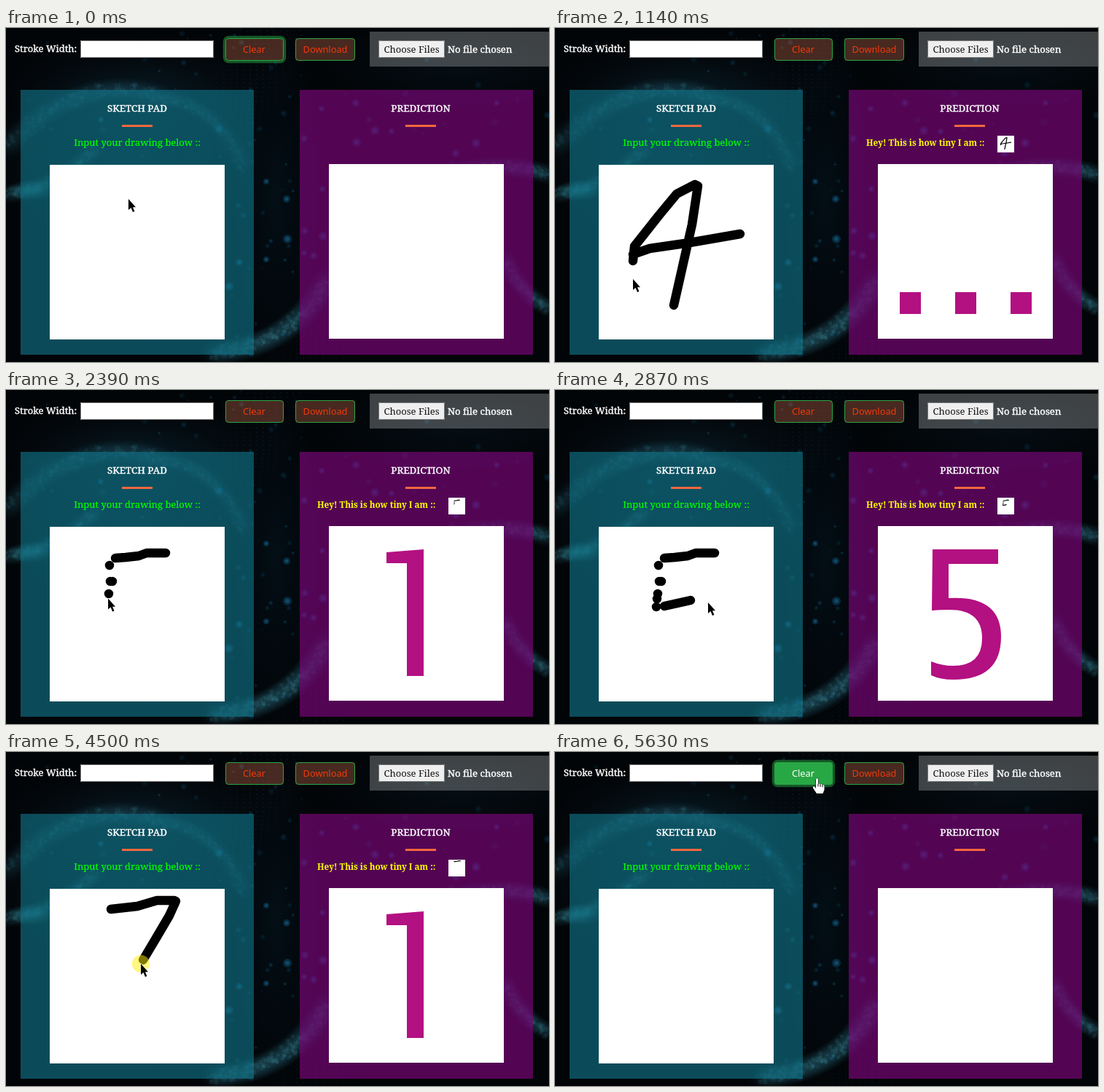
Animation of 745x459 px, one loop 5650 ms. Source, as an HTML page with a canvas:

```html
<!DOCTYPE html>
<html lang="en">
<head>
<meta charset="utf-8">
<title>Digit sketch pad</title>
<style>
html, body { margin: 0; width: 100%; height: 100%; overflow: hidden; background: #020508; }
canvas { display: block; }
</style>
</head>
<body>
<canvas id="stage" width="745" height="459"></canvas>
<script>
const W = 745, H = 459, LOOP = 5650, STEP = 95.5, TAU = Math.PI * 2;
const SERIF = '"Noto Serif", serif', SANS = '"Noto Sans", sans-serif';
const stage = document.getElementById('stage').getContext('2d');

const MOVE = 0, INK = 1, DOT = 2;
// Pointer track: step, x, y, how the pointer arrives
const track = [
  // 4: hook and stem, crossbar, then the diagonal
  [0, 168, 235, MOVE], [.8, 167, 228, MOVE], [1.2, 192, 215, INK], [1.4, 196, 217, INK], [1.9, 188, 270, INK],
  [2.9, 163, 381, INK], [3, 163, 383, MOVE], [4.3, 107, 311, MOVE], [4.6, 130, 303, INK], [5.1, 185, 295, INK],
  [5.8, 254, 283, INK], [9.5, 167, 228, MOVE], [10, 143, 257, INK], [10.7, 109, 300, INK], [11, 107, 320, INK],
  [12, 107, 345, MOVE], [13.5, 107, 345, MOVE], [16, 357, 25, MOVE], [17, 357, 25, MOVE],
  // 5: top bar, a broken back, middle bar, broken bowl
  [18.2, 219, 224, MOVE], [18.5, 193, 224, INK], [18.7, 182, 228, INK], [19, 164, 230, INK], [19.4, 150, 231, INK],
  [20.6, 142, 241, DOT], [21.3, 143, 263, DOT], [21.4, 146, 263, DOT], [21.8, 141, 280, DOT],
  [25.3, 140, 287, DOT], [25.6, 139, 298, DOT], [26.2, 150, 297, MOVE], [27.3, 186, 289, INK],
  [30, 210, 292, MOVE], [31, 210, 289, DOT], [32.2, 215, 293, DOT], [32.6, 219, 308, DOT], [33.1, 224, 323, DOT],
  [33.6, 220, 344, DOT], [38, 222, 350, MOVE], [40.8, 357, 28, MOVE], [41, 358, 25, MOVE], [42, 357, 21, MOVE],
  // 7: top bar, then the stem
  [43, 144, 216, MOVE], [43.7, 180, 212, INK], [44, 207, 204, INK], [44.3, 231, 204, INK],
  [46, 233, 205, MOVE], [46.4, 224, 225, INK], [46.7, 204, 259, INK], [47, 185, 291, INK], [47.8, 138, 373, INK],
  [48, 138, 380, MOVE], [55, 138, 380, MOVE], [58, 358, 36, MOVE], [60, 358, 36, MOVE]
];
const clears = [0, 17, 42, 59], presses = [17, 42, 58];

// Prediction pane: step, what it shows, step of the thumbnail snapshot
const results = [
  [0, ''], [4, 'wait', 3], [5, '1', 3], [6, 'wait', 6], [8, '7', 6], [12, 'wait', 12], [14, '4', 12], [17, ''],
  [20, 'wait', 20], [21, '1', 20], [22, 'wait', 22], [24, '1', 22], [28, 'wait', 28], [30, '5', 28],
  [34, 'wait', 34], [37, '5', 34], [42, ''],
  [45, 'wait', 45], [46, '1', 45], [49, 'wait', 49], [51, '7', 49], [59, '']
];
const digits = {
  1: 'M522 223L573 219V393H550V238H522Z',
  4: 'M577 219H600V333H622V352H600V393H577V352H502V333ZM577 248L524 333H577Z',
  5: 'M518 219H608V239H540V286Q612 282 612 339Q612 398 547 398Q528 398 516 392V373Q531 379 546 379Q586 379 586 341Q586 302 541 302Q528 302 517 303Z',
  7: 'M510 219H617V239L550 393H524L592 239H510Z'
};
const arrow = new Path2D('M0 0V15L3.5 12L6 18L8.4 17L6 11.3H10Z');
const hand = new Path2D('M0 1.5Q1.5-1 3 1.5V8Q5 6.5 6 8.5Q8 7 9 9Q11.5 8 11.5 11V16L9.5 21H1L-4 13.5Q-4.5 10.5-2 11.5L0 14Z');

function disc(c, x, y, r, color) {
  c.fillStyle = color;
  c.beginPath();
  c.arc(x, y, r, 0, TAU);
  c.fill();
}

function box(c, x, y, w, h, fill, border, radius = 0) {
  c.beginPath();
  c.roundRect(x, y, w, h, radius);
  c.fillStyle = fill;
  c.fill();
  if (!border) return;
  c.beginPath();
  c.roundRect(x + .5, y + .5, w - 1, h - 1, radius);
  c.strokeStyle = border;
  c.lineWidth = 1;
  c.stroke();
}

function text(c, str, x, y, font, color, align = 'left', weight = 0) {
  c.font = font;
  c.fillStyle = c.strokeStyle = color;
  c.textAlign = align;
  c.fillText(str, x, y);
  if (!weight) return;
  c.lineWidth = weight;
  c.strokeText(str, x, y);
}

function drawBackdrop(c) {
  let seed = 11;
  const rnd = () => (seed = seed * 16807 % 2147483647) / 2147483647;
  const glow = (x, y, rx, ry, rgb, alpha) => {
    c.save();
    c.translate(x, y);
    c.scale(rx, ry);
    const g = c.createRadialGradient(0, 0, 0, 0, 0, 1);
    g.addColorStop(0, `rgba(${rgb},${alpha})`);
    g.addColorStop(1, `rgba(${rgb},0)`);
    disc(c, 0, 0, 1, g);
    c.restore();
  };
  // Dotted, glowing ribbon along a quadratic curve
  const ribbon = (x0, y0, x1, y1, x2, y2, width, alpha) => {
    for (let i = 0; i <= 70; i++) {
      const t = i / 70, s = 1 - t;
      const x = s * s * x0 + 2 * s * t * x1 + t * t * x2;
      const y = s * s * y0 + 2 * s * t * y1 + t * t * y2;
      glow(x, y, width * 1.2, width, '45,120,140', alpha * .22);
      for (let j = 0; j < 2; j++)
        disc(c, x + (rnd() - .5) * width, y + (rnd() - .5) * width, 1.5 + rnd() * 2, `rgba(70,150,170,${alpha * .4})`);
    }
  };
  c.fillStyle = '#020508';
  c.fillRect(0, 0, W, H);
  glow(190, 90, 190, 75, '20,65,85', .22);
  glow(170, 170, 190, 130, '12,65,90', .3);
  glow(620, 50, 180, 60, '14,50,65', .2);
  glow(370, 230, 60, 240, '5,35,52', .3);
  // Faint columns of points
  for (let x = 205; x < 500; x += 9)
    for (let y = 4; y < H; y += 6) {
      const a = Math.max(0, Math.sin(x / 47 + y / 90)) * .18;
      disc(c, x + Math.sin(y / 40) * 4, y, 1.2, `rgba(20,75,100,${a})`);
    }
  ribbon(0, 165, 105, 55, 215, 96, 18, .22);
  ribbon(215, 96, 290, 105, 325, 190, 14, .13);
  ribbon(0, 228, 60, 225, 125, 165, 14, .18);
  ribbon(285, 446, 390, 440, 442, 345, 18, .34);
  ribbon(595, 205, 680, 178, 745, 202, 15, .24);
  ribbon(683, 315, 705, 365, 745, 385, 13, .17);
  glow(35, 223, 34, 15, '55,190,205', .35);
  const spot = (x, y, r, a) => {
    disc(c, x, y, r, `rgba(18,95,140,${a * .45})`);
    disc(c, x, y, r * .5, `rgba(30,120,160,${a * .5})`);
  };
  for (let i = 0; i < 70; i++)
    spot(210 + rnd() * 190, rnd() * H, 1.5 + rnd() * 3, .15 + rnd() * .3);
  for (let i = 0; i < 35; i++)
    spot(rnd() * W, rnd() * 190, 1.5 + rnd() * 4, .1 + rnd() * .3);
  [[433, 111], [480, 103], [506, 141], [529, 142], [409, 152], [481, 157], [673, 103], [617, 172], [645, 158],
   [434, 221], [410, 279], [435, 286], [409, 309], [422, 313], [292, 138], [130, 126], [320, 322], [306, 355],
   [357, 211], [385, 235], [386, 290], [357, 318]].forEach(([x, y], i) => spot(x, y, 4 + i % 3, .8));

  box(c, 20, 85, 320, 364, 'rgba(17,115,135,.64)');
  box(c, 403, 85, 320, 364, 'rgba(117,7,117,.7)');
  box(c, 499, 5, 246, 48, 'rgba(255,255,255,.24)');
  text(c, 'Stroke Width:', 12, 33, '13px ' + SERIF, '#fff', 'left', .4);
  box(c, 102, 17, 183, 24, '#fff', '#767676');
  box(c, 511, 17, 91, 24, '#efefef', '#767676', 2);
  text(c, 'Choose Files', 556.5, 34, '13px ' + SERIF, '#111', 'center');
  text(c, 'No file chosen', 606, 34, '13.2px ' + SERIF, '#fff', 'left', .4);
  box(c, 397, 14, 82, 31, 'rgba(155,85,62,.45)', '#28a745', 4);
  text(c, 'Download', 438, 34, '12.8px ' + SANS, '#f23a0a', 'center');
  text(c, 'SKETCH PAD', 180, 115, '13.4px ' + SERIF, '#fff', 'center', .4);
  text(c, 'PREDICTION', 569, 115, '13.4px ' + SERIF, '#fff', 'center', .4);
  box(c, 159, 133, 42, 3, '#f2683f');
  box(c, 548, 133, 42, 3, '#f2683f');
  text(c, 'Input your drawing below ::', 180, 162, '13px ' + SERIF, '#0f0', 'center', .2);
  box(c, 60, 188, 240, 240, '#fff');
  box(c, 443, 187, 240, 240, '#fff');
}

function pointerAt(k) {
  const i = track.findIndex(p => p[0] > k);
  const [k0, x0, y0, m0] = track[i - 1], [k1, x1, y1, mode] = track[i];
  const f = (k - k0) / (k1 - k0);
  const pressed = mode === INK || (k === k0 && m0 !== MOVE);
  return { x: x0 + (x1 - x0) * f, y: y0 + (y1 - y0) * f, pressed };
}

function drawInk(c, k) {
  const start = clears.filter(t => t <= k).pop(), end = k - .05;
  c.strokeStyle = '#000';
  c.lineWidth = 12.5;
  c.lineCap = c.lineJoin = 'round';
  c.beginPath();
  for (let i = 1; i < track.length; i++) {
    const [t, x, y, mode] = track[i], prev = track[i - 1];
    if (prev[0] < start || prev[0] > end) continue;
    if (mode === INK) {
      const p = t <= end ? { x, y } : pointerAt(end);
      if (prev[3] !== INK) c.moveTo(prev[1], prev[2]);
      c.lineTo(p.x, p.y);
    } else if (mode === DOT && t <= k) {
      c.moveTo(x, y);
      c.lineTo(x + .01, y);
    }
  }
  c.stroke();
}

function drawClearButton(c, k, hover) {
  const focus = k < 1 || k === 18 || presses.includes(k) || clears.includes(k);
  if (focus) {
    c.beginPath();
    c.roundRect(299.4, 12.4, 83.2, 34.2, 6);
    c.strokeStyle = 'rgba(40,167,69,.5)';
    c.lineWidth = 3.2;
    c.stroke();
  }
  const fill = !hover ? 'rgba(155,85,62,.45)' : k === 41 ? 'rgba(40,167,69,.88)' : '#28a745';
  box(c, 301, 14, 80, 31, fill, '#28a745', 4);
  const color = !hover ? '#f23a0a' : k === 41 ? '#fbe6e0' : '#fff';
  text(c, 'Clear', 340.5, 34, '12.8px ' + SANS, color, 'center');
}

function drawResult(c, k) {
  const [, show, snapshot] = results.filter(r => r[0] <= k).pop();
  if (!show) return;
  text(c, 'Hey! This is how tiny I am ::', 427, 162, 'bold 11.7px ' + SERIF, '#ff0');
  box(c, 607, 148, 23, 23, '#fff');
  c.save();
  c.translate(607, 148);
  c.scale(23 / 240, 23 / 240);
  c.translate(-60, -188);
  drawInk(c, snapshot);
  c.restore();
  c.fillStyle = '#b31082';
  if (show === 'wait') {
    for (const x of [473, 549, 625]) c.fillRect(x, 363, 29, 30);
  } else {
    c.fill(new Path2D(digits[show]), 'evenodd');
  }
}

function drawPointer(c, { x, y, pressed }, hover) {
  if (pressed) disc(c, x, y, 12, 'rgba(255,240,0,.5)');
  c.save();
  c.translate(x, y);
  c.lineWidth = 1;
  c.lineJoin = 'round';
  c.strokeStyle = hover ? '#000' : '#fff';
  c.fillStyle = hover ? '#fff' : '#000';
  const shape = hover ? hand : arrow;
  c.stroke(shape);
  c.fill(shape);
  if (hover) c.stroke(new Path2D('M3 8V11M6 8.5V11.5M9 9V12'));
  c.restore();
}

const backdrop = document.createElement('canvas');
backdrop.width = W;
backdrop.height = H;
drawBackdrop(backdrop.getContext('2d'));

function draw(now) {
  const k = Math.floor(now % LOOP / STEP + .08);
  const pointer = pointerAt(k);
  const hover = pointer.x > 301 && pointer.x < 381 && pointer.y > 14 && pointer.y < 45;
  if (presses.includes(k)) pointer.pressed = true;
  stage.drawImage(backdrop, 0, 0);
  drawClearButton(stage, k, hover);
  drawInk(stage, k);
  drawResult(stage, k);
  drawPointer(stage, pointer, hover);
}

const begin = performance.now();
function tick() {
  draw(performance.now() - begin);
  requestAnimationFrame(tick);
}
tick();
</script>
</body>
</html>
```
